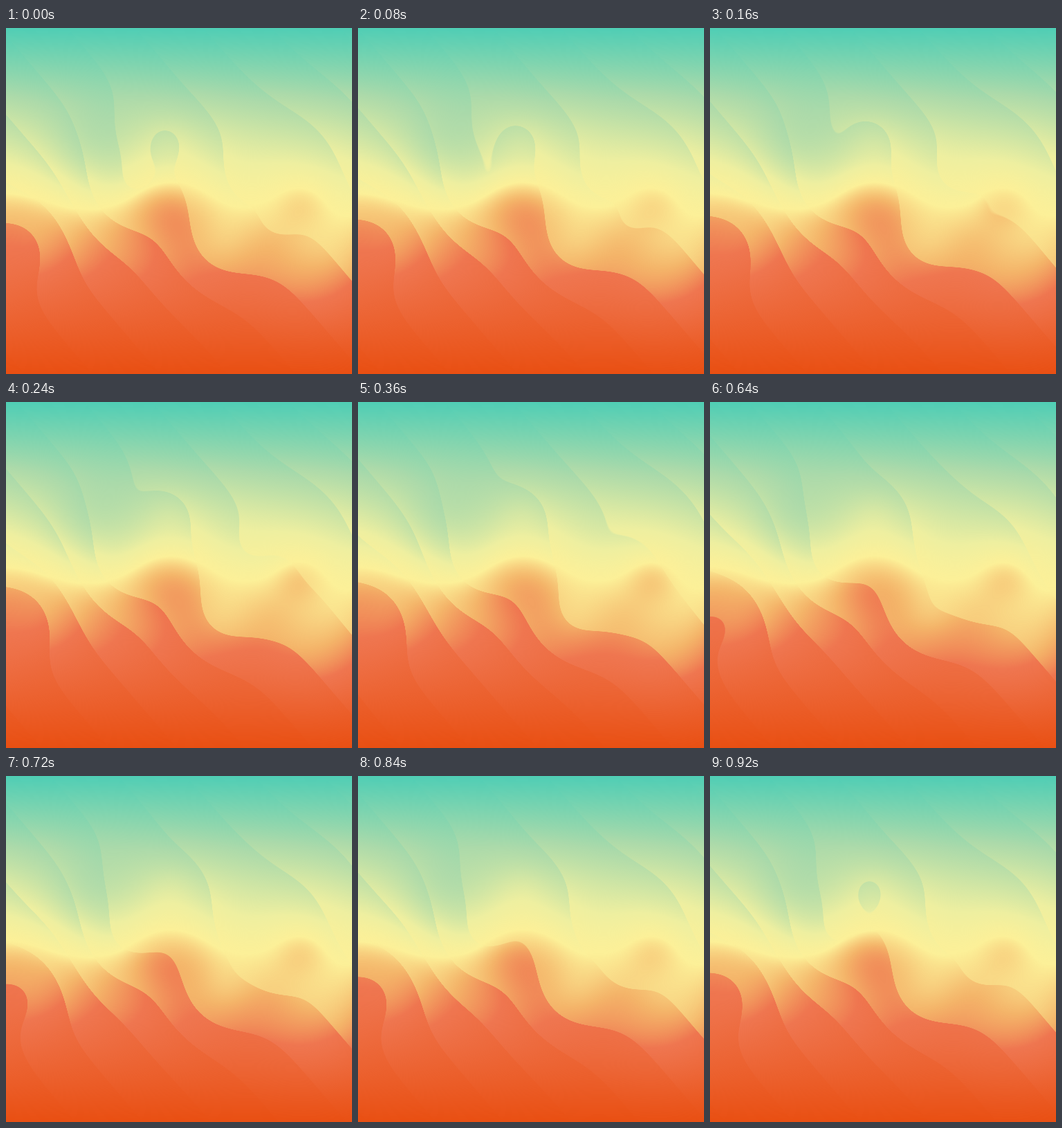
These frames come from a looping animation (500 px wide and 500 px high, 0.96 s). An HTML page with a canvas:

```html
<!DOCTYPE html>
<html lang="en">
<head>
<meta charset="utf-8">
<title>Drifting gradient</title>
<style>
html, body { margin: 0; width: 100%; height: 100%; overflow: hidden; background: #f3eb9c; }
canvas { display: block; width: 500px; height: 500px; }
</style>
</head>
<body>
<canvas id="stage" width="500" height="500"></canvas>
<script>
const SIZE = 500, LOOP = 960, STEP = 40, FINE = 4;
const CREST = 255, SPREAD = 80, SWING = 62;
const RAMP = { 0: '#50ceb5', 100: '#acdaaa', 200: '#eeefa0', 252: '#fcf098',
  300: '#f4b469', 345: '#ef7650', 500: '#e94f12' };

// Soft hills: x, y, height, radius
const phaseHills = [
  [165, 240, 1.1, 65], [165, 150, 0.45, 55], [237, 158, -0.36, 36],
  [300, 318, 0.95, 70], [335, 215, 0.5, 55], [390, 290, 0.35, 40],
  [30, 305, -0.9, 65], [460, 150, -0.4, 90]
];
const toneHills = [
  [120, 180, -50, 65], [235, 260, 50, 55], [0, 290, 30, 60],
  [310, 320, -30, 50], [425, 250, 35, 40], [460, 350, -50, 90]
];

const hills = (list, x, y) => list.reduce((sum, [cx, cy, h, r]) =>
  sum + h * Math.exp(-((x - cx) ** 2 + (y - cy) ** 2) / (r * r)), 0);

// Colour ramp as packed pixels, FINE entries per unit
function makeRamp() {
  const c = document.createElement('canvas');
  c.width = 1;
  c.height = SIZE * FINE;
  const g = c.getContext('2d'), fill = g.createLinearGradient(0, 0, 0, c.height);
  for (const at in RAMP) fill.addColorStop(at / SIZE, RAMP[at]);
  g.fillStyle = fill;
  g.fillRect(0, 0, 1, c.height);
  return new Uint32Array(g.getImageData(0, 0, 1, c.height).data.buffer);
}

const ramp = makeRamp();
const phase = new Float32Array(SIZE * SIZE);
const tone = new Float32Array(SIZE * SIZE);
const swing = new Float32Array(SIZE * SIZE);

// Each strip of phase pushes its tone further away from the crest
for (let y = 0, i = 0; y < SIZE; y++) {
  for (let x = 0; x < SIZE; x++, i++) {
    phase[i] = 3.09 + x / 98 - y / 114.5 + hills(phaseHills, x, y);
    const rest = y + hills(toneHills, x, y), d = (rest - CREST) / SPREAD;
    swing[i] = SWING * d * Math.exp(-d * d / 2);
    tone[i] = rest - swing[i] / 2;
  }
}

const ctx = document.getElementById('stage').getContext('2d');
const image = ctx.createImageData(SIZE, SIZE);
const pixels = new Uint32Array(image.data.buffer);
let shown = -1;

function draw(ms) {
  const step = Math.floor(ms % LOOP / STEP);
  if (step === shown) return;
  shown = step;
  const t = step * STEP / LOOP;
  for (let i = 0; i < pixels.length; i++) {
    let u = phase[i] - t;
    u -= Math.floor(u);
    if (u > 0.992) u = (1 - u) * 124; // soften the edge
    const at = (tone[i] + swing[i] * u) * FINE;
    pixels[i] = ramp[Math.max(0, Math.min(ramp.length - 1, at | 0))];
  }
  ctx.putImageData(image, 0, 0);
}

const start = performance.now();
function tick() {
  draw(performance.now() - start);
  requestAnimationFrame(tick);
}
tick();
</script>
</body>
</html>
```
